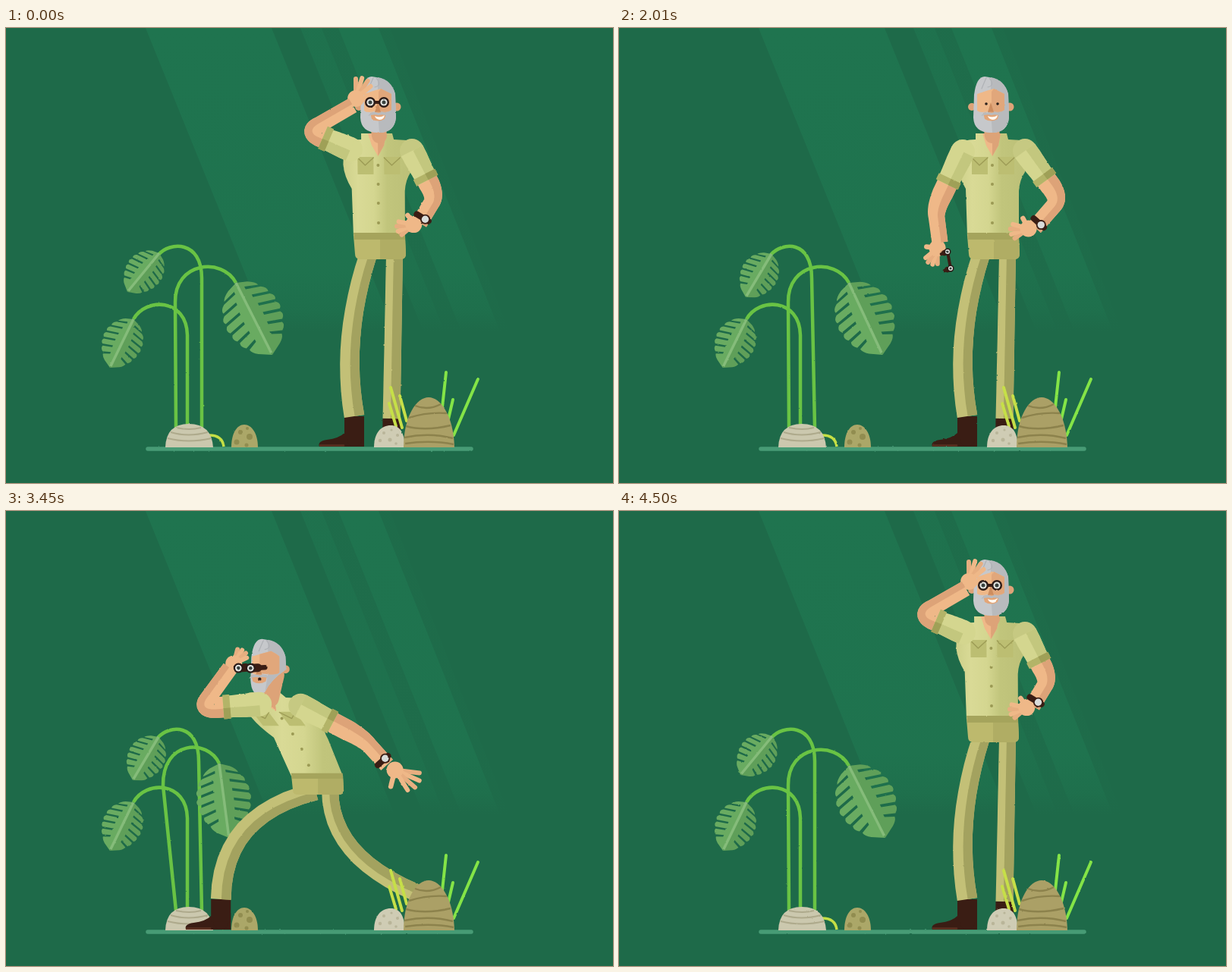
An HTML page that plays this animation: 800x600 px, repeating every 4530 ms.

```html
<!DOCTYPE html>
<html lang="en">
<head>
<meta charset="utf-8">
<title>Explorer</title>
<style>
html, body { margin: 0; width: 100%; height: 100%; overflow: hidden; background: #1e6a49; }
svg { display: block; width: 100vw; height: 100vh; }
</style>
</head>
<body>
<svg viewBox="0 0 800 600">
  <defs>
    <linearGradient id="fade" gradientUnits="userSpaceOnUse" x1="0" y1="0" x2="0" y2="400">
      <stop offset="0" stop-color="#1f744f"/>
      <stop offset=".8" stop-color="#1f744f" stop-opacity=".9"/>
      <stop offset=".93" stop-color="#1f744f" stop-opacity=".55"/>
      <stop offset="1" stop-color="#1f744f" stop-opacity="0"/>
    </linearGradient>
    <linearGradient id="cloth">
      <stop offset="0" stop-color="#cdd089"/>
      <stop offset=".2" stop-color="#d9da96"/>
      <stop offset=".42" stop-color="#d4d690"/>
      <stop offset=".6" stop-color="#c1c57c"/>
      <stop offset="1" stop-color="#bbbf77"/>
    </linearGradient>
    <filter id="rough" filterUnits="userSpaceOnUse" x="110" y="20" width="530" height="550" color-interpolation-filters="sRGB">
      <feTurbulence id="noise" type="fractalNoise" baseFrequency=".3" numOctaves="1" result="n"/>
      <feDisplacementMap in="SourceGraphic" in2="n" scale="2" xChannelSelector="R" yChannelSelector="G"/>
    </filter>
  </defs>
  <rect width="800" height="600" fill="#1e6a49"/>
  <g fill="url(#fade)">
    <path d="M184,0H350L512,400H346Z"/>
    <path d="M388,0H416L578,400H550Z" opacity=".75"/>
    <path d="M416,0H438L600,400H578Z" opacity=".25"/>
    <path d="M438,0H491L651,400H600Z"/>
    <path d="M491,0H506L675,430L651,400Z" opacity=".15"/>
  </g>
  <g filter="url(#rough)">
    <g id="plants"></g>
    <path d="M187,555H613" stroke="#479b75" stroke-width="5.5" stroke-linecap="round"/>
    <path d="M268,537Q285,537 287,552" fill="none" stroke="#c5df45" stroke-width="3.5"/>
    <path d="M210,553Q211,522 241,522Q271,522 273,553Z" fill="#cbc8ae"/>
    <path d="M217,533Q240,540 266,533M213,541Q240,548 271,541M224,527Q242,531 257,527" fill="none" stroke="#aeaa8c" stroke-width="2"/>
    <path d="M297,553C297,535 304,523 314,523S332,535 332,553Z" fill="#aba768"/>
    <g fill="#918d50"><circle cx="309" cy="533" r="3"/><circle cx="321" cy="539" r="4"/><circle cx="304" cy="546" r="3.5"/><circle cx="317" cy="550" r="2.5"/><circle cx="318" cy="528" r="2"/></g>
    <g id="man" stroke-linejoin="round" stroke-linecap="round"></g>
    <g fill="none" stroke-width="4" stroke-linecap="round">
      <path d="M507,474L522,527M505,495L514,525M519,485L528,518" stroke="#c6df48"/>
      <path d="M580,454L575,500M589,490L582,520M622,463L590,537" stroke="#84e447"/>
    </g>
    <path d="M485,553C485,533 495,524 507,524S525,533 526,553Z" fill="#cfccb4"/>
    <g fill="#b9b599"><circle cx="498" cy="534" r="2"/><circle cx="508" cy="530" r="1.6"/><circle cx="493" cy="544" r="2.2"/><circle cx="506" cy="543" r="2.5"/><circle cx="516" cy="537" r="2"/><circle cx="514" cy="548" r="1.8"/></g>
    <path d="M524,553C524,512 541,487 557,487S590,512 591,553Z" fill="#aba066"/>
    <path d="M539,498Q556,505 573,496M531,514Q556,506 581,508M527,525Q552,532 586,524M525,540Q558,533 589,541M526,548Q560,543 590,549" fill="none" stroke="#8c824c" stroke-width="2.4"/>
  </g>
</svg>
<script>
const LOOP = 4530, RAD = Math.PI / 180;
const $ = id => document.getElementById(id);
const fix = n => Math.round(n * 10) / 10;
const mix = (a, b, k) => a + (b - a) * k;
const mixPt = (a, b, k) => [mix(a[0], b[0], k), mix(a[1], b[1], k)];
const polar = (p, a, r) => [p[0] + Math.cos(a) * r, p[1] + Math.sin(a) * r];
const pt = p => fix(p[0]) + ',' + fix(p[1]);
const turnMix = (a, b, k) => a + Math.atan2(Math.sin(b - a), Math.cos(b - a)) * k;
const warp = (d, f) => d.replace(/(-?[\d.]+),(-?[\d.]+)/g, (_, x, y) => pt(f(+x, +y)));
const shape = (d, fill, extra = '') => `<path d="${d}" fill="${fill}" ${extra}/>`;
const line = (d, col, w) => shape(d, 'none', `stroke="${col}" stroke-width="${w}"`);
const dot = (p, r, fill) => `<circle cx="${fix(p[0])}" cy="${fix(p[1])}" r="${fix(r)}" fill="${fill}"/>`;

const SKIN = '#efb888', SKIN2 = '#dda378', DARK = '#3a1d14', TRIM = '#a5a45c';

/* head: x y tilt turn | body: x y lean height turn
   arms: shoulder elbow wrist, hand angle, hand size
   legs: hip knee ankle shaft foot | bino: centre, half gap, barrel, radius
   misc: eyes smile curl bend sway tipX */
const poses = {
  front: {
    head: [490, 100, 0, 0], body: [493, 275, -1, 1, 0],
    L: [454, 160, 398, 136, 457, 102, -65, 1], R: [535, 162, 566, 222, 545, 257, 165, .8],
    A: [477, 300, 441, 410, 459, 512, 0, 0], B: [512, 300, 510, 410, 508, 515, 0],
    bino: [489, 98, 9, 0, 0, 0, 7], misc: [0, 1, 0, 0, 0, 351]
  },
  up: {
    head: [499, 103, 8, 1], body: [494, 275, 2, 1, 1],
    L: [464, 153, 391, 123, 445, 92, -60, 1], R: [535, 164, 580, 223, 548, 263, 170, .85],
    A: [477, 300, 441, 410, 459, 512, 0, 0], B: [512, 300, 510, 410, 508, 515, 0],
    bino: [466, 84, 6, -3, 19, 8, 6], misc: [0, 1, 0, 0, .2, 349]
  },
  stand: {
    head: [490, 100, 0, 0], body: [494, 275, 0, 1, 0],
    L: [453, 163, 417, 238, 423, 283, 115, .8], R: [535, 162, 581, 225, 548, 263, 170, .85],
    A: [477, 300, 441, 410, 459, 512, 0, 0], B: [512, 300, 510, 410, 508, 515, 0],
    bino: [435, 306, 2, 11, -8, 3, 4.5], misc: [1, 1, 0, 0, 1, 348]
  },
  think: {
    head: [495, 100, 0, 0], body: [497, 275, 0, 1, 0],
    L: [454, 164, 447, 262, 460, 315, 70, .8], R: [536, 162, 540, 202, 510, 166, 243, 1],
    A: [480, 300, 424, 415, 465, 505, -16, -12], B: [514, 300, 511, 410, 508, 515, 0],
    bino: [497, 318, 7, 3, -9, 14, 4], misc: [1, 0, 1, 0, 1, 350]
  },
  lunge: {
    head: [345, 205, 0, 1], body: [411, 350, -65, .81, 1],
    L: [334, 255, 256, 261, 295, 207, -50, .75], R: [388, 257, 470, 300, 502, 335, 32, 1.25],
    A: [408, 370, 284, 400, 283, 512, 0, 0], B: [427, 368, 427, 455, 540, 503, -60],
    bino: [314, 207, 8, 0, 19, -1, 6.5], misc: [0, 0, 0, 1, 1, 294]
  },
  leap: {
    head: [475, 74, 0, .7], body: [477, 249, -2, 1, .1],
    L: [436, 138, 409, 212, 449, 217, 45, .7], R: [521, 138, 573, 190, 551, 208, 152, 1.1],
    A: [460, 275, 430, 370, 385, 471, 24, -56], B: [496, 275, 506, 370, 508, 485, 0],
    bino: [447, 242, 1, 9, 15, 1, 6.5], misc: [0, 1, 0, 1, .4, 307]
  }
};
const keys = [[0, 'front'], [480, 'front'], [780, 'up'], [1540, 'up'], [1850, 'stand'], [2170, 'stand'],
  [2400, 'think'], [2540, 'think'], [2770, 'lunge'], [3440, 'lunge'], [3800, 'leap'], [3880, 'leap'],
  [4270, 'front'], [LOOP, 'front']];

// Arms swing by angle; the binoculars follow the wrist.
for (const p of Object.values(poses)) {
  p.bino[0] -= p.L[4];
  p.bino[1] -= p.L[5];
  for (const s of 'LR') {
    const [a, b, c, d, e, f, g, size] = p[s];
    p[s] = [a, b, Math.hypot(c - a, d - b), Math.hypot(e - c, f - d),
      Math.atan2(d - b, c - a), Math.atan2(f - d, e - c), g * RAD, size];
  }
}

function poseAt(t) {
  let i = 0;
  while (i < keys.length - 2 && t >= keys[i + 1][0]) i++;
  const [t0, n0] = keys[i], [t1, n1] = keys[i + 1];
  let k = (t - t0) / (t1 - t0);
  k = k * k * (3 - 2 * k);
  const out = {};
  for (const part in poses[n0])
    out[part] = poses[n0][part].map((v, j) =>
      ('LR'.includes(part) && j > 3 && j < 7 ? turnMix : mix)(v, poses[n1][part][j], k));
  return out;
}

// A bent, tapering strip: samples of position, normal and half width.
function limb(a, b, c, bend, w0, w1) {
  const p = mixPt(b, a, bend), q = mixPt(b, c, bend), pts = [a];
  for (let i = 0; i <= 12; i++) {
    const k = i / 12;
    pts.push(mixPt(mixPt(p, b, k), mixPt(b, q, k), k));
  }
  pts.push(c);
  const n = pts.length - 1;
  return pts.map((o, i) => {
    const u = pts[Math.max(0, i - 1)], v = pts[Math.min(n, i + 1)];
    const dx = v[0] - u[0], dy = v[1] - u[1], l = Math.hypot(dx, dy) || 1;
    return { o, n: [-dy / l, dx / l], w: mix(w0, w1, i / n) / 2 };
  });
}
function strip(s, lo, hi, fill) {
  const edge = k => s.map(({ o, n, w }) => pt([o[0] + n[0] * w * k, o[1] + n[1] * w * k]));
  return shape('M' + [...edge(lo), ...edge(hi).reverse()].join('L') + 'Z', fill);
}
const shaded = (s, light, dark, cut = 0) => strip(s, -1, 1, light) + strip(s, -1, cut, dark);

function hand(w, ang, size, curl) {
  const c = polar(w, ang, 10 * size);
  let out = '';
  for (let i = 0; i < 4; i++) {
    const len = size * (i == 3 ? mix(25, 31, curl) : mix(29 - Math.abs(i - 1.5) * 2, 14, curl));
    out += line(`M${pt(c)}L${pt(polar(c, ang + (i - 1.5) * 17 * RAD, len))}`, i % 2 ? SKIN : '#e7ae80', 6);
  }
  return out + line(`M${pt(c)}L${pt(polar(c, ang + 72 * RAD, 18 * size))}`, SKIN, 6.5) + dot(c, 11, SKIN);
}

function arm(v, right, curl) {
  const s = [v[0], v[1]], e = polar(s, v[4], v[2]), w = polar(e, v[5], v[3]);
  const cut = Math.min(.65, 48 / v[2]);
  const cuff = mixPt(s, e, cut), start = mixPt(s, e, cut - 9 / v[2]);
  let out = hand(w, v[6], v[7], curl) + shaded(limb(s, e, w, .26, 28, 21), SKIN, SKIN2, -.15);
  if (right) {
    const m = polar(w, v[5], -8), n = v[5] + Math.PI / 2;
    out += line(`M${pt(polar(m, n, 9))}L${pt(polar(m, n, -9))}`, DARK, 8);
    const f = polar(m, n, -4);
    out += dot(f, 6.5, DARK) + dot(f, 4.7, '#d9dcda');
  }
  const sleeve = limb(s, mixPt(s, cuff, .5), cuff, .5, 32, 29);
  out += dot(s, 16, right ? '#c6c982' : '#d4d68f') + shaded(sleeve, '#d4d68f', '#c3c77e', -.1);
  const band = limb(start, mixPt(start, cuff, .5), cuff, .5, 32, 32);
  return out + shaded(band, '#b3b468', '#9fa057', -.1);
}

function leg(v, foot) {
  const a = [v[0], v[1]], k = [v[2], v[3]], e = [v[4], v[5]];
  const heel = polar(e, (90 + v[6]) * RAD, foot ? 30 : 38);
  let out = '';
  if (foot)
    out += `<g transform="translate(${pt(heel)}) rotate(${fix(v[7])})">` +
      shape('M13,-12L13,10L-46,10Q-49,3 -36,1Q-20,-1 -13,-8Z', DARK) +
      line('M-45,8.5L-14,8.5', '#5b3020', 2.5) + '</g>' + dot(heel, 10, DARK);
  out += strip(limb(e, mixPt(e, heel, .5), heel, .5, foot ? 26 : 23, 26), -1, 1, DARK);
  return out + shaded(limb(a, k, e, 1, foot ? 23 : 22, foot ? 27 : 23), '#c3c077', '#a3a25f', foot ? -.05 : .1);
}

function torso([hx, hy, lean, high, turn]) {
  const map = (x, y) => {
    const s = Math.max(0, 275 - y) / 133;
    return [hx + x - 494 + lean * s ** 1.5, hy + (y - 275) * high];
  };
  const side = (x, y) => map(x - 12 * turn, y);
  const open = (x, y) => map(x - 7 * turn, y);
  let out = shape(warp('M470,139L511,139L513,147L530,148Q544,152 543,167L535,190Q528,200 527,215L527,275L459,275L457,212Q447,195 446,180L447,156Q452,147 470,147Z', map), 'url(#cloth)');
  out += shape(warp('M459,274L527,274L528,298Q528,305 521,305L468,305Q461,305 461,298Z', map), '#bdb96d');
  out += shape(warp('M494,279L527,279L528,298Q528,305 521,305L494,305Z', map), '#b0ad64');
  out += shape(warp('M459,270L527,270L527,279L460,279Z', map), TRIM);
  out += shape(warp('M479,139L503,139L500,155L492,169L484,155Z', open), SKIN);
  out += shape(warp('M492,139L503,139L500,155L492,169Z', open), SKIN2);
  for (const x of [465, 500]) {
    out += shape(warp(`M${x},170L${x + 21},170L${x + 21},193L${x},193Z`, side), '#bcbe72');
    out += line(warp(`M${x},171L${x + 10},181L${x + 21},171`, side), '#9c9b55', 1.3);
  }
  for (const y of [181, 206, 231, 257]) out += dot(open(492, y), 2, '#9b9a54');
  return out;
}

function head([x, y, tilt, turn], eyes, smile) {
  const f = -12 * turn, g = `translate(${fix(x)} ${fix(y)}) rotate(${fix(tilt)})`;
  const fx = d => warp(d, (u, v) => [u + f, v]);
  // Turning uncovers the neck behind the beard.
  const jaw = `L24,${18 - 14 * turn}Q${22 - 19 * turn},${38 - 20 * turn} ${2 - 6 * turn},${38 - 4 * turn}`;
  let out = `<g transform="${g}">` + line(`M${9 * turn},${26 - 14 * turn}L2,42`, SKIN2, 20 + 5 * turn);
  out += dot([-25 + 10 * turn, 4], 5, SKIN2) + dot([25 - 2 * turn, 4], 5.5, SKIN2);
  out += shape(`M-22,-12Q-19,-36 -8,-36Q18,-33 23,-13${jaw}L${-10 * turn},38Q-22,38 -23,18Z`, '#c6c8cb');
  out += shape(`M0,-35Q18,-32 23,-13${jaw}L0,10Z`, '#b8babd');
  const l = -18 - 3 * turn, r = 18 - 3 * turn;
  out += shape(`M${l},-13Q-4,-18 4,-20Q12,-16 ${r},-13L${r},8Q12,13 ${f},9Q-14,13 ${l},9Z`, SKIN);
  out += shape(`M${1 + f},-16L4,-20Q12,-16 ${r},-13L${r},8Q12,13 ${f + 1},9Z`, SKIN2, 'opacity=".8"');
  out += line('M-12,-20Q-8,-30 -6,-34M-4,-22Q6,-24 -2,-34', '#aeb1b5', 1.2);
  out += shape(fx('M0,-2L4,11L-4,11Z'), '#cd8d5f');
  out += shape(fx('M-10,12Q0,9 11,12L9,20Q0,25 -8,20Z'), '#e3a577');
  out += shape(fx('M-13,16Q-8,9 1,12Q10,9 14,16Q6,13 1,15Q-5,13 -13,16Z'), '#b9bbbe');
  out += smile > .5 ? shape(fx('M-4,16Q3,19 9,15Q8,21 2,21Q-3,20 -4,16Z'), '#fff8f0') : dot([1 + f, 17], 2.2, '#30201c');
  if (eyes > .5) out += dot([-6 + f, 0], 1.8, '#2a201c') + dot([9 + f, 0], 1.8, '#2a201c');
  return out + '</g>';
}

function bino(v, wrist) {
  const o = [wrist[0] + v[0], wrist[1] + v[1]], [, , sx, sy, dx, dy, r] = v;
  const lens = [[o[0] - sx, o[1] - sy], [o[0] + sx, o[1] + sy]];
  let out = line(`M${pt(lens[0])}L${pt(lens[1])}`, DARK, 4);
  for (const c of lens)
    out += line(`M${pt(c)}l${fix(dx)},${fix(dy)}`, DARK, r) + line(`M${pt(c)}l${fix(dx * .5)},${fix(dy * .5)}`, DARK, r * 1.7);
  for (const c of lens)
    out += dot(c, r, '#2b1b17') + dot(c, r * .66, '#e4e6e2') + dot(c, r * .36, '#38413f');
  return out;
}

// Lobed leaf hanging from base to tip.
function leaf(base, tip, wide) {
  const dx = tip[0] - base[0], dy = tip[1] - base[1], n = 7;
  const at = (u, v) => pt([base[0] + dx * u - dy * v, base[1] + dy * u + dx * v]);
  const w = u => wide * Math.sin(Math.PI * Math.min(.99, u) ** .9) ** .6;
  let out = '';
  for (const s of [1, -1]) {
    let d = 'M' + at(0, 0);
    for (let i = 0; i < n; i++) {
      const u = i * .128, a = u + .05, b = u + .145;
      d += `L${at(a, s * w(a) * .92)}Q${at((a + b) / 2, s * w((a + b) / 2) * 1.06)} ${at(b, s * w(b) * .94)}`;
      if (i < n - 1) d += `L${at(u + .09, s * w(u + .09) * .36)}L${at(u + .125, s * w(u + .09) * .36)}`;
    }
    out += shape(d + `L${at(1, 0)}Z`, s > 0 ? '#69ab61' : '#5f9f59');
  }
  return out + line(`M${at(0, 0)}L${at(.97, 0)}`, '#85bc7a', 3.5);
}

function plants(lunge, sway, tipX, t) {
  const b = lunge, s = Math.sin(t / LOOP * Math.PI * 4);
  const x = mix(223, 207, b), end = [mix(303, 281, b), mix(336, 333, b)], ax = 258 - 4 * sway;
  const stem = d => line(d, '#69c344', 4.5);
  return stem(`M258,527L${ax},330C${ax},279 215,282 ${201 - sway},299`) +
    stem('M239,527L239,405C238,356 184,355 168,384') +
    stem(`M224,527L${x},362C${x - 1},${mix(308, 302, b)} ${mix(285, 266, b)},${mix(302, 300, b)} ${pt(end)}`) +
    leaf([202 - sway, 297 + sway], [160 + 7 * sway, 348 + 7 * sway], .38) +
    leaf([168, 384], [137 + s * .5, 448], .38) +
    leaf(end, [tipX + s, 431], .37);
}

function draw(t) {
  const p = poseAt(t), [eyes, smile, curl, bend, sway, tipX] = p.misc;
  const elbow = polar(p.L, p.L[4], p.L[2]), wrist = polar(elbow, p.L[5], p.L[3]);
  $('cloth').setAttribute('gradientTransform', `translate(${fix(p.body[4] * .2)} 0)`);
  $('plants').innerHTML = plants(bend, sway, tipX, t);
  $('man').innerHTML = leg(p.B, false) + leg(p.A, true) + torso(p.body) +
    head(p.head, eyes, smile) + arm(p.R, true, curl) + arm(p.L, false, 0) + bino(p.bino, wrist);
  $('noise').setAttribute('seed', 1 + Math.floor(t / 120) % 6);
}

let last = -1;
function tick() {
  const t = Math.floor(performance.now() % LOOP / 30) * 30;
  if (t !== last) draw(last = t);
  requestAnimationFrame(tick);
}
tick();
</script>
</body>
</html>
```
